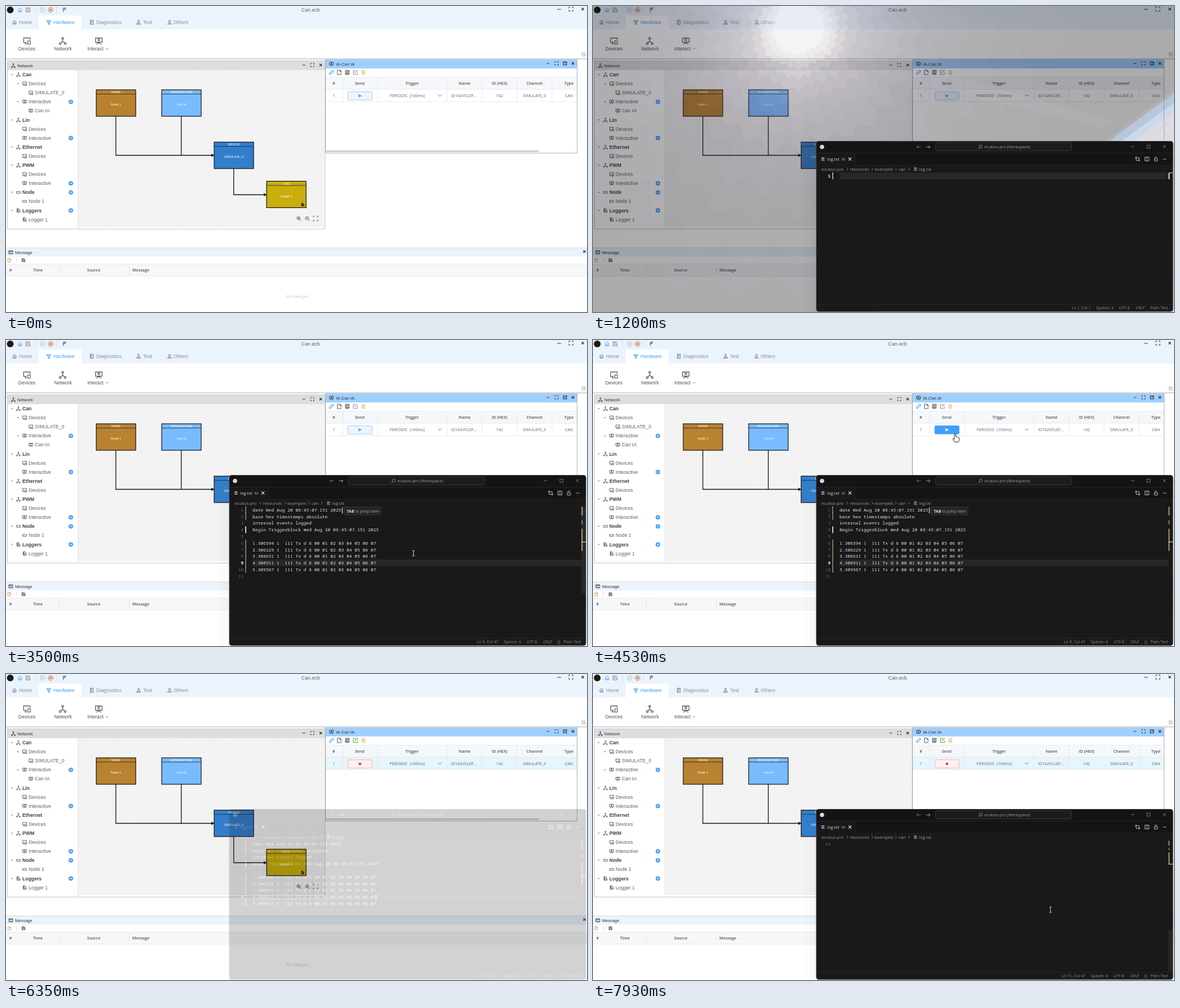
An HTML page that plays this animation: 1030 px wide and 544 px high, repeating every 8 s.

```html
<!DOCTYPE html>
<html lang="en">
<head>
<meta charset="utf-8">
<title>Can.ecb</title>
<style>
html, body { margin: 0; width: 100%; height: 100%; overflow: hidden; background: #fff; }
svg { display: block; width: 1030px; height: 544px; }
text { white-space: pre; font-family: "Liberation Sans", Arial, sans-serif; }
.ui { font-family: "Open Sans", "Noto Sans", sans-serif; }
.code { font-family: "Noto Sans Mono", "DejaVu Sans Mono", monospace; }
</style>
</head>
<body>
<svg id="stage" viewBox="0 0 1030 544"></svg>
<script>
const LOOP = 8000;
const stage = document.getElementById('stage');

// ---- markup helpers ----
const rect = (x, y, w, h, fill, more = '') =>
  `<rect x="${x}" y="${y}" width="${w}" height="${h}" fill="${fill}" ${more}/>`;
const box = (x, y, w, h, fill, line, r = 0, lw = 1) =>
  rect(x, y, w, h, fill, `stroke="${line}" stroke-width="${lw}" rx="${r}"`);
const path = (d, color, w = 1, fill = 'none', more = '') =>
  `<path d="${d}" fill="${fill}" stroke="${color}" stroke-width="${w}" ${more}/>`;
const text = (x, mid, s, size, fill, more = '') =>
  `<text x="${x}" y="${(mid + size * .35).toFixed(2)}" font-size="${size}" fill="${fill}" ${more}>${s}</text>`;
const MID = 'text-anchor="middle" ', END = 'text-anchor="end" ';
const UI = 'class="ui" ', BOLD = 'font-weight="bold" ', SEMI = 'font-weight="600" ';

// icon paths centred on 0,0 in a box of about 8 px
const ICONS = {
  net: 'M0-1.4V1M-2.4 2.2L0 .6 2.4 2.2M-1-2.6a1 1 0 1 0 2 0a1 1 0 1 0-2 0M-3.6 2.8a1 1 0 1 0 2 0a1 1 0 1 0-2 0M1.6 2.8a1 1 0 1 0 2 0a1 1 0 1 0-2 0',
  dev: 'M3.4-1V-3H-3.4V1.6H0M-2 3.2H0M-1.6 1.6V3M1 0H3.6V3.4H1Z',
  ia: 'M-3.4-3H3.4V1.4H-3.4ZM-2.5 3.6L0 1.6 2.5 3.6M-1-1.2a1 1 0 1 0 2 0a1 1 0 1 0-2 0',
  node: 'M-3.3-1.6H3.3V1.6H-3.3Z',
  log: 'M-2.6-3.3H.8L2-2V0M-2.6-3.3V3H0M.4.6H3V3.3H.4ZM-1.5-2V2M-.5-2V0',
  home: 'M-3.4-.2L0-3.3 3.4-.2M-2.6-.6V3.3H-.7V.9H.7V3.3H2.6V-.6',
  save: 'M-3.4-3.4H2.2L3.4-2.2V3.4H-3.4ZM-1.8-3.4V-1.4H1.4V-3.4M-2 3.4V.6H2V3.4',
  ring: 'M-4 0a4 4 0 1 0 8 0a4 4 0 1 0-8 0',
  tool: 'M-3-3.2H3V-1H-3ZM-1-1V3.4H1V-1M-3-2L-4-1',
  flag: 'M-2.6 3.6V-3.3H3M-2.6-.6H2M0-3.3V-.6',
  book: 'M-2.6-3.6H2.8V3.6H-2.6ZM-1-3.6V3.6M0-1.6H1.6M0 .8H1.6',
  flask: 'M-1.3-3.6H1.3M-.9-3.6V-.8L-3.4 3.4H3.4L.9-.8V-3.6M-2 1.2H2',
  user: 'M-1.7-1.8a1.7 1.7 0 1 0 3.4 0a1.7 1.7 0 1 0-3.4 0M-3.4 3.2Q0-.6 3.4 3.2Z',
  min: 'M-2.5 0H2.5',
  full: 'M-3-1.2V-3H-1.2M1.2-3H3V-1.2M3 1.2V3H1.2M-1.2 3H-3V1.2',
  close: 'M-2.2-2.2L2.2 2.2M2.2-2.2L-2.2 2.2',
  out: 'M0-2.8H-2.8V2.8H2.8V0M.8-2.8H2.8V-.8M2.8-2.8L-.4.4',
  link: 'M-.8-1L1.4-3Q3-3.8 3.4-2.4 3.6-1 2-.2L.8.8M.8 1L-1.4 3Q-3 3.8-3.4 2.4-3.6 1-2 .2L-.8-.8',
  file: 'M-3.2-3.8H.8L3-1.6V1M-3.2-3.8V3.8H.4M.8-3.8V-1.4H3M1 2L3.4 4.2M3.4 2L1 4.2',
  stack: 'M-3.6-2.2Q0-4.8 3.6-2.2 0 .2-3.6-2.2M-3.6 0Q0 2.6 3.6 0M-3.6 2Q0 4.8 3.6 2',
  edit: 'M.6-3.2H-3.4V3.4H3.2V0M-1 1L3.6-3.8',
  bin: 'M-3.2-2.8H3.2M-2.4-2.8V3.4H2.4V-2.8M-1-3.8H1M-.8-1V1.8M.8-1V1.8',
  down: 'M-2.5-1.2L0 1.3 2.5-1.2',
  right: 'M-1.2-2.4L1.2 0-1.2 2.4',
  lens: 'M-3-.8a2.6 2.6 0 1 0 5.2 0a2.6 2.6 0 1 0-5.2 0M1.6 1.2L4 3.8',
  list: 'M-3-2.4H2M-3-.8H3M-3 .8H1M-3 2.4H3',
  term: 'M-3.4-2.8H3.4V2.8H-3.4ZM-3.4-1.9H3.4M-2-.4L-.8.5-2 1.4M0 1.5H2',
  lock: 'M-2.8-.4H2.8V3.6H-2.8ZM-1.8-.4V-2.2Q-1.4-4 .4-3.8 1.8-3.4 1.8-2',
  split: 'M-3.6-3.4H3.6V3.4H-3.6ZM0-3.4V3.4',
  diff: 'M-3.6-3.4H-1.6V-1.4H-3.6ZM1.6 1.4H3.6V3.4H1.6ZM-2.6-1.4V2.4H.4M2.6 1.4V-2.4H-.4',
  left: 'M3.5 0H-3.5M-.8-2.6L-3.5 0-.8 2.6'
};
const icon = (name, x, y, color = '#5c5f66', k = 1, w = .9) =>
  `<g transform="translate(${x} ${y}) scale(${k})">${path(ICONS[name], color, w / k)}</g>`;

// ---- desktop: flat glow bands and a planet limb ----
function desktop() {
  const cx = 364, cy = 38;
  const bands = [[450, '#0c0b11'], [385, '#110f16'], [320, '#17141d'], [272, '#1f1b26'], [234, '#28222e'],
    [200, '#342c3b'], [172, '#41384a'], [147, '#50455a'], [124, '#605469'], [102, '#74687b'],
    [83, '#91868f'], [68, '#b7adaf'], [57, '#cdc7cf'], [45, '#e3dfe3']];
  let s = rect(0, 0, 1030, 544, '#08080d');
  bands.forEach(([r, c], n) => {
    let d = '';
    for (let i = 0; i < 112; i++) {
      const a = i / 112 * Math.PI * 2;
      const tooth = Math.abs(i % 4 - 2) - 1;
      const k = 1 + .05 * tooth + .03 * Math.sin(a * 7 + n * .3) + .02 * Math.sin(a * 3 + 1);
      d += `${i ? 'L' : 'M'}${(cx + Math.cos(a) * r * k * 1.02).toFixed(1)} ${(cy + Math.sin(a) * r * k * 1.06).toFixed(1)}`;
    }
    s += path(d + 'Z', 'none', 0, c);
  });
  s += path('M450 72L925 205 905 216 450 108Z', 'none', 0, '#4d4052', 'opacity=".2"');
  [['#1d1b28', -7], ['#315f95', 0], ['#5f93c8', 17], ['#8f97b4', 31], ['#a09aa6', 36]].forEach(([c, o]) => {
    s += path(`M915 ${241 + o}Q974 ${195 + o} 1034 ${153 + o}V548H500Z`, 'none', 0, c);
  });
  for (let i = 0; i < 16; i++) {
    const x = 978 + i * 37 % 48, y = 238 - (x - 978) * .72 + i * 13 % 26;
    s += path(`M${x} ${y}l8-5.6`, i % 2 ? '#b9b2ba' : '#88828f', 1.2);
  }
  return s;
}

// ---- network diagram ----
function node(x, y, fill, kind, label) {
  const kindText = text(x + 35, y + 4.2, kind, 5.7, '#fff', MID);
  return box(x, y, 70, 47, fill, '#111', 0, 1.2) + path(`M${x} ${y + 7.5}h70`, '#222', .8) +
    kindText + text(x + 35, y + 26, label, 5.7, '#fff', MID);
}
function network() {
  const rows = [
    [0, 'Can', 'net', 1, 0], [1, 'Devices', 'dev', 1, 0], [2, 'SIMULATE_0', 'dev', 0, 0],
    [1, 'Interactive', 'ia', 1, 1], [2, 'Can IA', 'ia', 0, 0], [0, 'Lin', 'net', 1, 0],
    [1, 'Devices', 'dev', 0, 0], [1, 'Interactive', 'ia', 0, 1], [0, 'Ethernet', 'net', 1, 0],
    [1, 'Devices', 'dev', 0, 0], [0, 'PWM', 'net', 1, 0], [1, 'Devices', 'dev', 0, 0],
    [1, 'Interactive', 'ia', 0, 1], [0, 'Node', 'node', 1, 1], [1, 'Node 1', 'node', 0, 0],
    [0, 'Loggers', 'log', 1, 1], [1, 'Logger 1', 'log', 0, 0]];
  let s = box(2.5, 97.5, 563, 299, '#fff', '#c6c6c9') + rect(3, 98, 562, 16, '#dcdde0') +
    icon('net', 13, 106, '#333') + text(20, 106, 'Network', 7.6, '#333') +
    icon('min', 528, 105, '#222') + icon('full', 543, 105, '#222') + icon('close', 558, 105, '#222', 1, 1.2) +
    rect(128, 114, 436, 279, '#f3f3f4') + rect(128, 114, 436, 279, 'url(#dots)') + path('M127.5 114V396', '#e4e4e6');
  rows.forEach(([depth, label, kind, open, plus], i) => {
    const y = 122 + 16.1 * i, x = 11 * depth;
    if (open) s += path(`M${8 + x} ${y - 1}h4.4l-2.2 2.8z`, 'none', 0, '#a8abb2');
    s += icon(kind, 22 + x, y, '#4c4f55') + text(29 + x, y, label, 8.67, depth ? '#606266' : '#404247', depth ? '' : BOLD);
    if (plus) s += `<circle cx="115" cy="${y}" r="3.9" fill="#409eff"/>` + path(`M113 ${y}h4M115 ${y - 2}v4`, '#fff', .8);
  });
  s += path('M194.7 196V265.5H365M310.7 196V265.5M403.7 289V335.5H458', '#111', 1.3) +
    path('M364 262.7L370 265.5 364 268.3ZM457 332.7L463 335.5 457 338.3Z', 'none', 0, '#111') +
    node(160, 149, '#b88230', 'NODE', 'Node 1') + node(276, 149, '#79bbff', 'INTERACTIVE', 'Can IA') +
    node(369, 242, '#337ecc', 'DEVICE', 'SIMULATE_0') + node(462, 311.5, '#c9ae0c', 'LOG', 'Logger 1') +
    icon('log', 526, 353, '#111', .75, 1);
  s += icon('lens', 519, 378, '#555', 1.1) + path('M516.8 377.2h3.6M518.6 375.4v3.6', '#555', .8) +
    icon('lens', 534, 378, '#555', 1.1) + path('M531.8 377.2h3.6', '#555', .8) + icon('full', 549, 378, '#666', 1.4);
  return s;
}

// ---- interactive table ----
function table() {
  const edges = [597, 659, 782, 844, 906, 968];
  const cols = [[581, '#', '1'], [627, 'Send', ''], [720, 'Trigger', ''], [813, 'Name', ''],
    [875, 'ID (HEX)', '142'], [937, 'Channel', 'SIMULATE_0'], [998, 'Type', 'CAN']];
  let s = box(566.5, 95.5, 446, 166, '#fff', '#b0b3b8') + rect(567, 95, 445, 16, '#a0cfff') +
    icon('ia', 577, 103, '#333') + text(585, 103, 'IA-Can IA', 7.6, '#333') +
    icon('min', 961, 102, '#222') + icon('full', 976, 102, '#222') + icon('out', 991, 102, '#222', 1, 1.1) +
    icon('close', 1005, 102, '#222', 1, 1.2) +
    icon('link', 577, 118, '#409eff', 1.1, 1.1) + icon('file', 591, 118, '#444', 1.1) + icon('stack', 605, 118, '#444', 1.1, 1.2) +
    `<g id="edit">${icon('edit', 619.5, 118, 'currentColor', 1.1, 1.1)}</g>` + icon('bin', 633.5, 118, '#efbd6e', 1, 1.1) +
    rect(567, 126.5, 445, 21.5, '#f5f7fa') + rect(567, 148, 445, 22, '#fff', 'id="row"') +
    path('M567 126.5H1012M567 148H1012M567 170H1012' + edges.map(x => `M${x} 127V170`).join(''), '#e6e9ef');
  for (const [x, head, cell] of cols)
    s += text(x, 137.5, head, 7.2, '#50535a', MID + UI + SEMI) + text(x, 159.5, cell, 7.2, '#606266', MID + UI);
  return s + text(680, 159.5, 'PERIODIC  (100ms)', 7.2, '#606266', UI) + icon('down', 769, 159, '#555', 1.2) +
    text(789, 159.5, 'ID142VCLEF...', 7.2, '#606266', UI) +
    box(606, 152.5, 43, 14.5, '#ecf5ff', '#a0cfff', 1.5, 1).replace('<rect', '<rect id="send"') +
    `<path id="sign"/>` + rect(567, 256.8, 378, 2.6, '#c9cbce', 'rx="1.3"');
}

function app() {
  let s = rect(0, 0, 1030, 544, '#fff') + rect(0, 0, 1030, 41.5, '#ebf4fd') + rect(58, 17, 76, 25, '#fff', 'rx="2"');
  s += '<circle cx="7.5" cy="7" r="6" fill="#1d1b12"/>' +
    icon('home', 25, 7, '#409eff', 1.1) + icon('save', 39, 7, '#8a8d93', 1.1) +
    path('M52.5 2V12M89.5 2V12', '#d5dae2') + icon('ring', 65, 7, '#b0b3b9', 1.05) + path('M63.8 5L67 7 63.8 9Z', '#b0b3b9', .6) +
    icon('ring', 79, 7, '#d0743c', 1.05, 1.1) + rect(77.2, 5.2, 3.6, 3.6, '#d0743c') + icon('flag', 104, 7, '#444') +
    text(540, 7, 'Can.ecb', 8.8, '#606266', MID) +
    icon('min', 980.5, 6, '#222', 1.4) + icon('full', 1001.5, 5.5, '#222', 1.2) + icon('close', 1022.5, 5.5, '#222', 1, 1.2);
  [['home', 15, 23, 'Home'], ['tool', 76, 84, 'Hardware'], ['book', 152, 160, 'Diagnostics'],
    ['flask', 235, 243, 'Test'], ['user', 290, 297, 'Others']].forEach(([k, ix, x, label], i) => {
    const c = i === 1 ? '#409eff' : '#8b8f96';
    s += icon(k, ix, 29, c, 1, 1.1) + text(x, 29, label, 8.7, c);
  });
  s += icon('dev', 37, 62, '#444', 1.7, 1.1) + icon('net', 100.5, 62, '#444', 1.7, 1.1) + icon('ia', 164.5, 62, '#444', 1.7, 1.1) +
    text(37, 76, 'Devices', 8.6, '#505359', MID) + text(101, 76, 'Network', 8.6, '#505359', MID) +
    text(158.5, 76, 'Interact', 8.6, '#505359', MID) + icon('down', 179, 76, '#777', .9) +
    icon('out', 1024, 86, '#aaa') + path('M1021 83L1027 89', '#aaa', .8) + path('M0 94H1030', '#c2c4c8', 1.4);
  s += network() + table();
  s += rect(0, 430, 1030, 15.5, '#ebf4fd') + path('M0 430H1030', '#d3dae3') +
    icon('term', 8.5, 438, '#333') + text(16, 438, 'Message', 7.6, '#333') + icon('close', 1025.5, 436.5, '#222', 1, 1.2) +
    icon('file', 6, 452, '#e08a3c', .8) + path('M18.5 448V456', '#d5d8de') + icon('save', 31, 452, '#444', .8) +
    rect(0, 459, 1030, 21, '#f6f7f9') + path('M0 459H1030M0 480H1030', '#e6e9ef') + path('M94.5 463V476M218.5 463V476', '#dfe2e8');
  [[8, '#'], [56.5, 'Time'], [155.5, 'Source'], [239, 'Message']].forEach(([x, h]) => {
    s += text(x, 469.5, h, 7.2, '#50535a', MID + UI + SEMI);
  });
  return s + text(516, 516, 'No data yet', 7.4, '#bccbd0', MID + UI);
}

// ---- log file ----
const LINE = 11.79, FIRST = 302;
const STAMP = 'date Wed Aug 20 08:45:07.151 2025';
const log = [STAMP, 'base hex timestamps absolute', 'internal events logged', STAMP.replace('date', 'Begin Triggerblock'), ''];
const beat = (sec, frac) => `${sec}.${frac} 1  111 Tx d 8 00 01 02 03 04 05 06 07`;
['306394', '306229', '308631', '308911', '309567', '309058', '309248', '309008'].forEach((f, i) => log.push(beat(i + 1, f)));
const times = [8.530765, 8.631424, 8.730768, 8.832674, 8.934163, 9.03405, 9.133639];
for (let n = 0; log.length < 42; n++) {
  const at = times[n] || 8.5321 + n * .1003 + (n * 7 % 5) * .00037;
  const whole = Math.floor(at);
  if (n > 6 && at % 1 > .309 && at % 1 < .41) log.push(beat(whole, '30' + (9100 + n)));
  const byte = ((n * 32 + 128) % 160).toString(16).padStart(2, '0');
  log.push(`${at.toFixed(6)} 1  142 Tx d 8 00 00 04 00 00 00 00 ${byte}`);
}
log.length = 42;
log.push('');

function editor() {
  let s = '';
  for (let i = 1; i <= 6; i++)
    s += rect(396 - i * 4, 240 + i * 2, 640 + i * 4, 310, '#000', 'opacity=".005" rx="6"');
  s += box(396, 240.5, 632, 302.5, '#191919', '#3a3a3a', 4) + rect(396.5, 241, 631, 42, '#141414', 'rx="4"') +
    rect(397, 262, 68, 21.5, '#191919') + path('M397 261.5H1027', '#242424') + path('M465 283.3H1027M465.5 262V283', '#262626', .8) +
    '<circle cx="406" cy="250.5" r="3.8" fill="#d8d8d8"/>' +
    icon('left', 577.5, 250.5, '#777') + `<g transform="rotate(180 594 250.5)">${icon('left', 594, 250.5, '#aaa')}</g>` +
    box(607, 243, 241.5, 14.5, '#1b1b20', '#34343c', 3) +
    `<g transform="matrix(-1 0 0 1 1374 0)">${icon('lens', 687, 250.5, '#999')}</g>` +
    text(694, 250.5, 'ecubus-pro (Workspace)', 7.2, '#a0a0a0', UI) +
    icon('min', 956.5, 250, '#888', 1.1) + box(982, 247.3, 5.5, 5.5, 'none', '#888', 0, .8) + icon('close', 1013, 250, '#888', 1.1) +
    icon('list', 408, 272, '#ccc') + text(415, 272, 'log.txt', 7.5, '#d8d8d8', UI) + text(440.5, 272, 'M', 7.3, '#a8a8a8', UI) +
    icon('close', 455.5, 272, '#eee', 1.15, 1.1) + icon('diff', 965.5, 272, '#ccc') + icon('split', 982, 272, '#ccc') +
    icon('lock', 998, 272, '#ccc') + text(1010, 270, '...', 8, '#ddd', UI + BOLD);
  [[405, 'ecubus-pro', 451], [455.5, 'resources', 495], [499, 'examples', 537], [542, 'can', 560]].forEach(([x, w, next]) => {
    s += text(x, 290, w, 7.5, '#9b9b9b', UI) + icon('right', next, 290, '#8a8a8a');
  });
  s += icon('list', 572, 290, '#aaa') + text(578, 290, 'log.txt', 7.5, '#9b9b9b', UI);

  s += '<g clip-path="url(#page)"><g id="scroll">' + rect(437, 296, 583, 12, '#272727', 'id="active"');
  log.forEach((line, i) => {
    const y = FIRST + i * LINE;
    s += `<g class="line">` + text(421, y, i + 1, 7.7, '#666', END + 'class="code"') +
      `<g>${text(437, y, line, 7.95, '#e2e2e2', 'class="code"')}</g></g>`;
  });
  const mark = (from, to, c, dash) => path(`M425 ${296 + from * LINE}V${296 + to * LINE}`, c, 2, 'none', dash ? 'stroke-dasharray="1.4 .7"' : '');
  s += `<g id="blank">${mark(0, 1, '#ddd', 1)}</g>` +
    `<g id="marks">${mark(0, 2, '#b5a27a', 1) + mark(3, 4, '#c9c9c9') + mark(5, 10, '#b5a27a', 1)}</g>` +
    rect(655.6, 0, 1, 11, '#fff', 'id="caret"') + '</g></g>';

  s += `<g id="ruler0">${path('M1021 296.5H1028', '#ddd', 1) + rect(1020, 297, 2.4, 11, '#bbb')}</g>` +
    `<g id="ruler1">${rect(1020, 296.5, 2.4, 15.5, '#9a8556') + rect(1020, 320, 2.4, 8, '#55705a') + rect(1020, 335.5, 2.4, 39.5, '#9a8556') + path('M1020 359H1028', '#ccc', 1.2)}</g>` +
    `<g id="ruler2">${rect(1020, 296.5, 2.4, 8.5, '#9c7060') + rect(1020, 309, 2.4, 4, '#55705a') + rect(1020, 317, 2.4, 21, '#a08544') + path('M1020 338H1028', '#ccc', 1.2)}</g>` +
    rect(1020, 296, 7.5, 154, '#fff', 'id="thumb" opacity=".06"');
  s += path('M397 530.5H1027', '#262626');
  const status = (x, w, more = '') => text(x, 537, w, 7.1, '#8e8e8e', UI + more);
  s += '<g id="mid">' + status(882.5, '', END + 'id="pos"') + status(892, 'Spaces: 4') + status(932.5, 'UTF-8') + status(962, 'CRLF') + '</g>' +
    status(977.5, '{}', 'id="brace"') + status(988, 'Plain Text');
  s += `<g id="tip">${rect(595.6, 297.5, 1.2, 11, '#ddd') + box(599, 296.8, 66, 14, '#252525', '#363636', 2)}
    <text class="ui" x="604" y="306.6" font-size="7" fill="#aaa"><tspan font-weight="bold" fill="#ddd">TAB</tspan> to jump here</text></g>`;
  return s;
}

function cursors() {
  return '<g id="mouse">' +
    path('M0 0V11L2.6 8.6 4.4 12.6 6 11.9 4.3 8H7.8Z', '#111', .8, '#fff', 'id="arrow"') +
    path('M-1.2.6Q0-.8 1.2.6V5Q2.2 4.4 3.2 5.4 4.2 5 5.1 6.1 6.6 5.7 7.2 7V10.5Q7 12.5 5.6 14.5H-.6L-4 9.6Q-4.4 8-2.8 8.2L-1.2 9.6Z', '#111', .9, '#fff', 'id="hand"') +
    path('M-2-4.8H-.6L0-4.3 .6-4.8H2M0-4.3V4.3M-2 4.8H-.6L0 4.3 .6 4.8H2', '#ddd', 1, 'none', 'id="beam"') + '</g>';
}

stage.innerHTML = `<defs><pattern id="dots" x="128" y="114" width="7.3" height="7.3" patternUnits="userSpaceOnUse">${rect(3, 3, .9, .9, '#dededf')}</pattern>
  <clipPath id="page"><rect x="396" y="296" width="632" height="234"/></clipPath></defs>
  ${desktop()}<g id="app">${app()}</g><g id="editor">${editor()}</g>${cursors()}`;

// ---- motion ----
const $ = id => document.getElementById(id);
const lines = [...document.querySelectorAll('.line')];
const show = (id, on) => { $(id).style.display = on ? '' : 'none'; };
const set = (id, attrs) => { for (const k in attrs) $(id).setAttribute(k, attrs[k]); };
const ramp = (t, a, b) => Math.min(1, Math.max(0, (t - a) / (b - a)));
const step = (t, table) => table.reduce((v, [at, value]) => t >= at ? value : v, table[0][1]);

const PEEK = 870, RETURN = 1070, LOAD = 1890, CLICK = 1960, TIP = 3230, RAISE = 4930, REOPEN = 6350, RELOAD = 6830, CLICK2 = 7050;
const trips = [
  [[1420, 745, 556], [1600, 752, 480], [1810, 738, 412], [1900, 730, 393], [2160, 730, 391], [2360, 730, 391],
    [2600, 722, 401], [2970, 730, 398], [3430, 730, 398], [3800, 690, 300], [4190, 612, 176], [4260, 618, 164],
    [4530, 642, 167], [4860, 642, 167], [5100, 660, 300], [5450, 690, 556]],
  [[6830, 800, 556], [7050, 806, 426], [7250, 809, 421], [7500, 809, 421], [7580, 811, 419], [8000, 811, 419]]];
const scrolls = [[0, 0], [7510, 9], [7580, 18], [7790, 26], [7860, 34], [7930, 42]];

function pointer(t) {
  for (const trip of trips)
    for (let i = 1; i < trip.length; i++) {
      const [t0, x0, y0] = trip[i - 1], [t1, x1, y1] = trip[i];
      if (t >= t0 && t < t1) {
        const k = (t - t0) / (t1 - t0);
        return { x: x0 + (x1 - x0) * k, y: y0 + (y1 - y0) * k };
      }
    }
  return null;
}

function draw(t) {
  const open = t >= PEEK && t < RAISE || t >= REOPEN;
  const running = t >= RAISE;
  const p = pointer(t);
  const onPage = !!p && open && p.x > 396 && p.y > 283 && p.y < 530;
  const onSend = !!p && p.x > 606 && p.x < 649 && p.y > 152 && p.y < 167.5;

  $('app').style.opacity = t < PEEK ? 1 : ramp(t, RETURN - 40, 1290);
  show('editor', open);
  $('editor').style.opacity = t >= REOPEN ? ramp(t, REOPEN - 60, 6610) : 1;

  // send button and row
  const tone = running ? ['#fef0f0', '#fab6b6', '#f56c6c'] : ['#ecf5ff', '#a0cfff', '#409eff'];
  set('send', { fill: onSend ? tone[2] : tone[0], stroke: onSend ? tone[2] : tone[1] });
  set('sign', {
    d: running ? 'M625.5 157.7h4v4h-4z' : 'M624.3 156.8L631 159.7 624.3 162.6 625.6 159.7Z',
    fill: onSend ? '#fff' : running ? '#c43c3c' : tone[2]
  });
  set('row', { fill: running ? '#e5f6fd' : '#fff' });
  $('edit').style.color = running ? '#4fae22' : '#8f9298';

  // editor content
  const phase = t >= RELOAD ? 2 : t >= LOAD ? 1 : 0;
  const count = [1, 11, 43][phase];
  const active = t >= CLICK2 ? 11 : t >= CLICK ? 9 : 1;
  const top = step(t, scrolls);
  lines.forEach((g, i) => {
    g.style.display = i < count ? '' : 'none';
    const [num, body] = g.children;
    const on = i + 1 === active;
    num.setAttribute('fill', on ? '#fff' : '#666');
    num.setAttribute('font-weight', on ? 'bold' : 'normal');
    body.style.display = phase && !(phase === 1 && i > 9) ? '' : 'none';
  });
  set('scroll', { transform: `translate(0 ${-top * LINE})` });
  const lineTop = 296 + (active - 1) * LINE;
  set('active', { y: lineTop });
  set('caret', { y: lineTop + .5 });
  const since = t >= CLICK2 ? t - CLICK2 : t - CLICK;
  show('caret', active > 1 && Math.floor(since / 500) % 2 === 0);
  show('blank', !phase);
  show('marks', phase);
  for (let i = 0; i < 3; i++) show('ruler' + i, i === phase);
  show('thumb', onPage && phase);
  set('thumb', phase === 2 ? { y: 296 + 160 * top / 42, height: top ? 74 : 82 } : { y: 296, height: 154 });
  show('tip', t >= TIP && t < RAISE);
  show('brace', phase);
  set('mid', { transform: `translate(${phase ? -9.7 : 0} 0)` });
  $('pos').textContent = `Ln ${active}, Col ${active > 1 ? 47 : 1}`;

  // pointer
  show('mouse', p);
  if (p) set('mouse', { transform: `translate(${p.x} ${p.y})` });
  show('beam', onPage);
  show('hand', onSend);
  show('arrow', !onPage && !onSend);
}

const start = performance.now();
function tick() {
  draw((performance.now() - start) % LOOP);
  requestAnimationFrame(tick);
}
tick();
</script>
</body>
</html>
```
